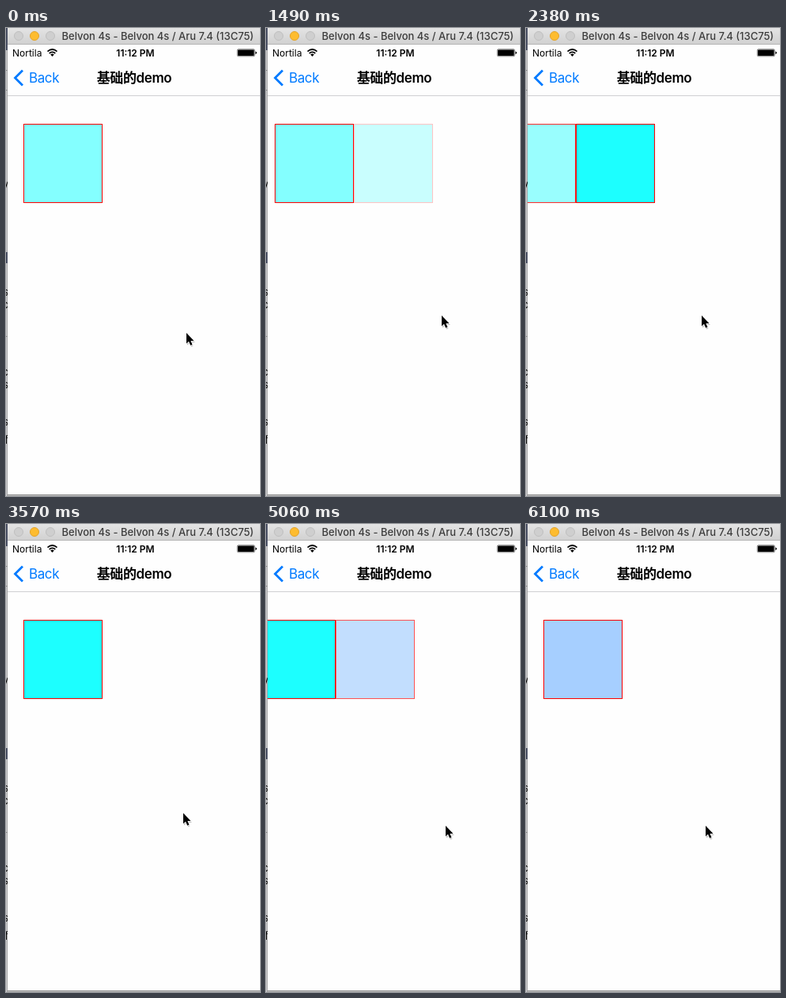
These frames come from a looping animation (321 px wide and 591 px high, 8000 ms). An HTML page:

```html
<!DOCTYPE html>
<html lang="zh">
<head>
<meta charset="utf-8">
<title>基础的demo</title>
<style>
html, body { margin: 0; width: 100%; height: 100%; overflow: hidden; background: #fefefe; }
svg { display: block; font-family: Inter, "Noto Sans CJK SC", "Noto Sans CJK", sans-serif; }
.box rect { stroke: #f00; }
.nav { font-size: 17px; letter-spacing: -.4px; }
.behind { font-size: 13px; text-anchor: end; }
</style>
</head>
<body>
<svg width="321" height="591" viewBox="0 0 321 591">
  <defs>
    <linearGradient id="bar" x2="0" y2="1">
      <stop stop-color="#e4e4e4"/><stop offset="1" stop-color="#d0d0d0"/>
    </linearGradient>
    <clipPath id="screen"><path d="M2 86H321V589H2z"/></clipPath>
  </defs>

  <!-- sliver of the windows behind -->
  <path fill="#d2d2d4" d="M0 0H2V591H0z"/>
  <path fill="#a0a0a2" d="M1 28H2V591H1z"/>
  <path fill="#4a5064" d="M0 0H2V28H0zM0 283H2V297H0z"/>
  <path fill="#8c8c8e" d="M0 53H2V54H0zM0 78H2V79H0zM0 389H2V390H0z"/>
  <g class="behind">
    <text x="3" y="202">y</text>
    <text x="3" y="338">s</text>
    <text x="3" y="354">c</text>
    <text x="3" y="439">c</text>
    <text x="3" y="455">s</text>
    <text x="3" y="502">s</text>
    <text x="3" y="525">f</text>
  </g>

  <path fill="#fefefe" d="M2 21H321V589H2z"/>
  <path fill="#8f8f8f" d="M2 589H321V590H2z"/>
  <path fill="#bcbcbc" d="M2 590H321V591H2z"/>

  <!-- window title bar -->
  <path fill="url(#bar)" d="M2 0H321V21H2z"/>
  <path fill="#b4b4b4" d="M2 20H321V21H2z"/>
  <g fill="#cfcfcf" stroke="#bfbfbf">
    <circle cx="16" cy="10" r="5.5"/>
    <circle cx="36" cy="10" r="5.5" fill="#fdbc30" stroke="#e3a32b"/>
    <circle cx="56" cy="10" r="5.5"/>
  </g>
  <text x="70.5" y="15" font-size="13" font-weight="500" fill="#3c3c3c">Belvon 4s - Belvon 4s / Aru 7.4 (13C75)</text>

  <!-- status bar -->
  <text x="8" y="36" font-size="12">Nortila</text>
  <path d="M52.5 29.6Q58.5 24.4 64.5 29.6M54.7 32Q58.5 28.8 62.3 32" fill="none" stroke="#000" stroke-width="1.7"/>
  <path d="M56.2 33.4Q58.5 31.6 60.8 33.4L58.5 35.9z"/>
  <text x="163.5" y="36" font-size="12" font-weight="600" text-anchor="middle">11:12 PM</text>
  <rect x="292.25" y="26.75" width="22" height="9" rx="1.5" fill="none" stroke="#000" stroke-width=".5"/>
  <rect x="293" y="27.5" width="20.5" height="7.5" rx=".8"/>
  <path d="M315.3 29.5Q317 30 317 31.2T315.3 33z"/>

  <!-- navigation bar -->
  <path fill="#d0d0d2" d="M2 85H321V86H2z"/>
  <path d="M21 53.5L11.5 63L21 72.5" fill="none" stroke="#007aff" stroke-width="2.8"/>
  <text class="nav" x="29" y="69" fill="#007aff">Back</text>
  <text class="nav" x="162" y="69" font-weight="600" text-anchor="middle">基础的demo</text>

  <g clip-path="url(#screen)">
    <g class="box" id="prev"><rect x=".5" y="121.5" width="99" height="99"/></g>
    <g class="box" id="next"><rect x=".5" y="121.5" width="99" height="99"/></g>
  </g>

  <g id="cursor">
    <path d="M1 2V15.5L4 13L6 17.5L8.5 16.5L6.5 12H11z" fill="#000" opacity=".25"/>
    <path d="M0 0V13.5L3 10.8L5.2 15.8L7.5 14.8L5.4 9.9H9.5z" stroke="#fff" stroke-width="1.6" paint-order="stroke"/>
  </g>
</svg>
<script>
const LOOP = 8000, STEP = 148.7, PUSH = 2000, LEFT = 22, SIZE = 100;
const colors = ['#84ffff', '#1cffff', '#a6cfff'];
const starts = [930, 4015];
// step, x, y
const path = [[0, 228, 385], [3, 222, 363], [23, 222, 363], [24, 224, 365], [26, 227, 381], [60, 227, 381]];
const [prev, next, cursor] = ['prev', 'next', 'cursor'].map(id => document.getElementById(id));

// cubic-bezier(.42, 0, 1, 1)
function easeIn(x) {
  let lo = 0, hi = 1;
  for (let i = 0; i < 24; i++) {
    const s = (lo + hi) / 2;
    if (1.26 * s * (1 - s) ** 2 + 3 * s * s - 2 * s ** 3 < x) lo = s; else hi = s;
  }
  return 3 * lo * lo - 2 * lo ** 3;
}

function place(box, x, color, alpha) {
  box.setAttribute('transform', `translate(${Math.round(x)})`);
  box.setAttribute('fill', color);
  box.setAttribute('opacity', Math.max(0, Math.min(1, alpha)));
}

function draw(now) {
  // the screen refreshes in fixed steps
  const n = Math.floor((now % LOOP + 9) / STEP), t = n * STEP;

  const k = t < starts[1] ? 0 : 1;
  const p = easeIn(Math.max(0, Math.min(1, (t - starts[k]) / PUSH)));
  const x = LEFT - SIZE * p;
  place(prev, x, colors[k], 2 - 2 * p);
  place(next, x + SIZE, colors[k + 1], 2 * p);

  const i = path.findIndex(key => key[0] > n);
  const [a, b] = [path[i - 1], path[i]];
  const f = (n - a[0]) / (b[0] - a[0]);
  const at = j => Math.round(a[j] + (b[j] - a[j]) * f);
  cursor.setAttribute('transform', `translate(${at(1)} ${at(2)})`);
}

function tick() {
  draw(performance.now());
  requestAnimationFrame(tick);
}
tick();
</script>
</body>
</html>
```
